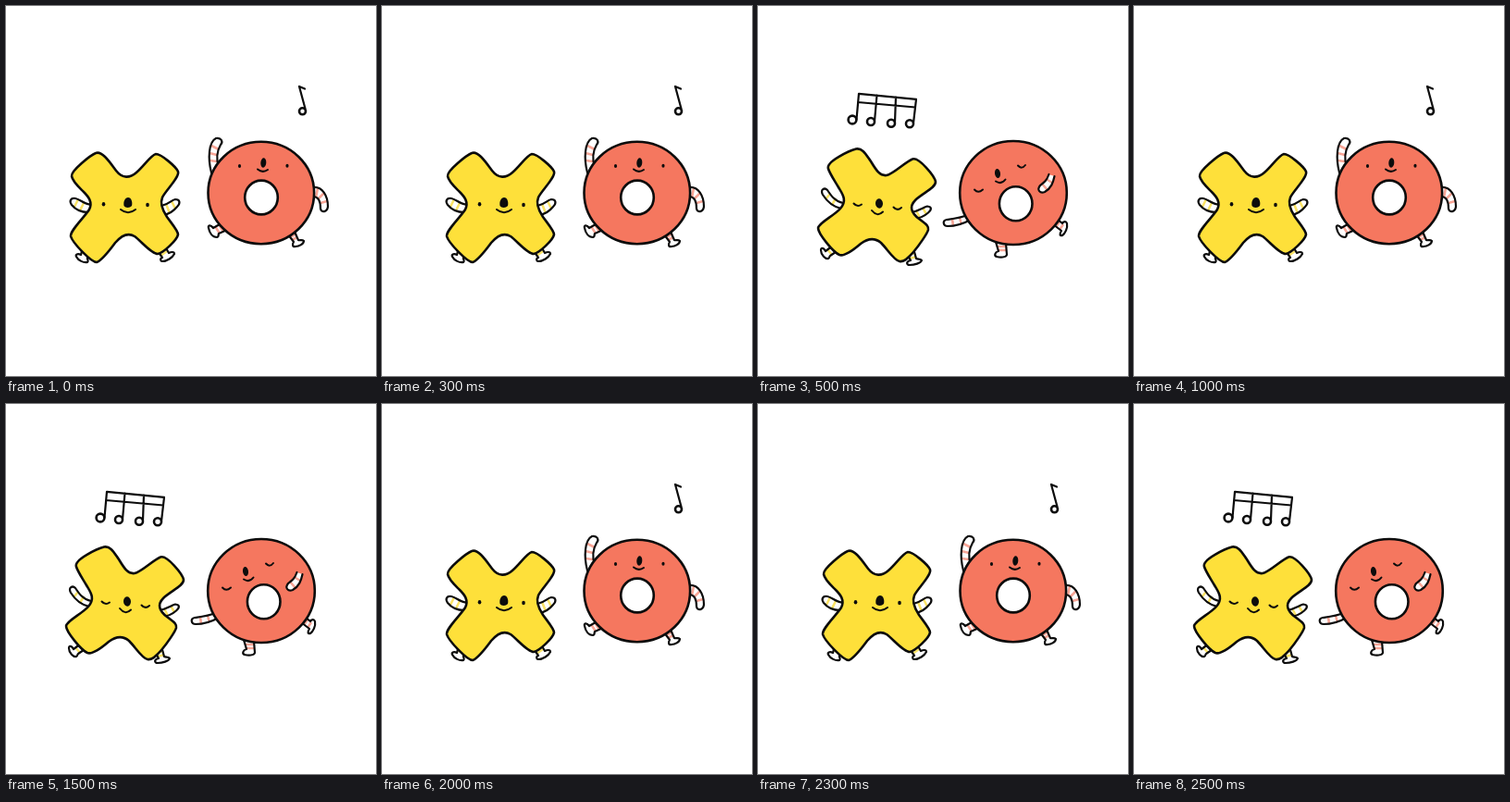
These frames come from a looping animation (400 px wide and 400 px high, 3000 ms). An HTML page:

```html
<!DOCTYPE html>
<html lang="en">
<head>
<meta charset="utf-8">
<title>Dancing X and O</title>
<style>
html, body { margin: 0; width: 100%; height: 100%; overflow: hidden; background: #fff; }
svg { display: block; width: 100vw; height: 100vh; }
path, ellipse { stroke-linecap: round; stroke-linejoin: round; }
.line { fill: none; stroke: #0c0c0c; stroke-width: 2.6; }
.thin { stroke-width: 2; }
.limb { stroke-width: 2.2; }
.white { fill: #fff; }
.x { fill: #fee03a; }
.o { fill: #f5775f; }
.ink { fill: #0c0c0c; }
.band { fill: none; stroke-width: 2.6; stroke-linecap: butt; }
.band.bx { stroke: #fbe366; }
.band.bo { stroke: #f8a596; }
</style>
</head>
<body>
<svg id="stage" viewBox="0 0 400 400"></svg>
<script>
const BEAT = 500, LOOP = 3000;

const line = (d, cls = '') => `<path class="line ${cls}" d="${d}"/>`;
const oval = (x, y, rx, ry, cls, turn = 0) =>
  `<ellipse class="${cls}" cx="${x}" cy="${y}" rx="${rx}" ry="${ry}" transform="rotate(${turn} ${x} ${y})"/>`;
const limb = (kind, d, bands) =>
  `<path class="white" d="${d}"/><path class="band b${kind}" d="${bands}"/>` + line(d, 'limb');
const head = (x, y, r) => oval(x, y, r, r, 'line white');

function openEyed() {
  const x =
    limb('x', 'M92 215C84 214 80 209 75 208C70 207 68 211 71 215C75 220 82 223 89 223', 'M78 209L74 217M84 213L80 221') +
    limb('x', 'M168 216C177 214 178 210 183 209C188 209 189 213 185 217C181 222 176 225 170 226', 'M179 211L183 219M173 214L177 224') +
    limb('x', 'M83 261L81 269C77 267 75 269 76 271C78 275 84 278 88 277C90 275 87 273 88 272L92 265', 'M82 266L89 270M84 262L91 266') +
    limb('x', 'M164 265L169 272C166 273 167 276 169 276C174 276 180 272 182 268C182 265 178 266 176 267L172 260', 'M167 270L174 265M165 266L172 261') +
    line('M71 184C70 178 92 161 97 159C104 156 113 170 119 178C126 187 134 186 141 180C149 173 157 161 162 160C168 160 184 174 186 179C188 185 172 200 169 207C166 214 170 222 174 228C179 235 186 243 186 247C185 253 170 267 164 268C157 268 146 254 139 249C131 244 124 249 118 256C112 264 104 275 98 277C92 277 72 256 70 249C69 243 85 228 90 220C94 212 89 206 84 201C79 196 72 190 71 184Z', 'x') +
    oval(105.5, 214.3, 1.8, 2.3, 'ink') + oval(153, 215, 1.8, 2.3, 'ink') +
    '<path class="ink" d="M127.5 216C126.5 211 129 207 132 207C135.5 207 137 212 136 216C134 218.5 129 218.5 127.5 216Z"/>' +
    line('M124 220Q132 226.5 140 220', 'thin');
  const o =
    limb('o', 'M222 180C218 165 219 147 227 143C233 142 235 147 232 150C228 157 227 165 230 174', 'M222 151L230 155M220 159L228 161M220 167L228 168') +
    limb('o', 'M332 196C342 195 348 205 348 217C347 223 341 224 340 219C340 212 338 206 332 206', 'M337 197L335 207M344 202L338 208M347 211L340 213') +
    limb('o', 'M231 236L224 240C221 236 218 237 219 240C220 245 223 250 228 250C231 249 229 247 230 246L239 242', 'M226 238L231 246M230 236L235 244') +
    limb('o', 'M305 247L311 255C309 258 310 261 313 260C317 260 322 257 322 254C320 252 317 254 316 253L312 244', 'M309 253L315 250M307 250L314 246') +
    oval(275.8, 202, 57.3, 55.2, 'line o') + oval(276, 207, 17.8, 18.4, 'line white') +
    oval(252.5, 173, 1.6, 2, 'ink') + oval(304, 172.7, 1.6, 2, 'ink') +
    oval(278.3, 169.5, 3, 5.2, 'ink', 5) +
    line('M272 176.5Q277.5 181 283 177', 'thin');
  const note = line('M323 89.5L317 87L323.5 111', 'limb') + head(320.5, 113.8, 3.5);
  return x + o + note;
}

function eyesShut() {
  const x =
    limb('x', 'M92 213C83 211 79 205 75 199C72 196 67 198 70 204C75 212 81 217 90 219', 'M78 203L73 209M84 208L80 215') +
    limb('x', 'M165 223C174 222 178 218 183 216.5C188 217 188 220 184 223.5C179 228 174 230 167 230', 'M178 218L182 225M171 221L175 229') +
    limb('x', 'M81 259L73 265C71 261 68 261 68 264C68 269 73 274 76 273C78 272 77 270 78 270L87 264', 'M75 263L80 269M80 260L85 266') +
    limb('x', 'M160 266L165 275C160 276 160 280 164 280C169 280 176 278 177 275C176 273 173 274 171 273L168 262', 'M164 273L171 271M162 269L170 267') +
    line('M76 176C73 168 100 156 106 154.5C113 153 117 161 122 168C128 178 132 184 139 183C146 182 160 168 167 165.5C174 163 191 184 192 190C192 197 178 202 170 210C163 217 166 224 174 230C180 235 185 237 184 242C183 246 174 259 168 266C161 274 157 277 153 276C147 275 140 263 133 256C127 251 119 251 111 257C104 263 93 271 88 269C81 266 65 246 65 240C66 234 82 227 89 219C97 210 91 203 87 196C83 189 78 182 76 176Z', 'x') +
    line('M103.5 213.5Q107.5 218 112 214.5M146.5 217.5Q150.5 222 155 218', 'thin') +
    oval(131, 213.5, 4, 5.2, 'ink', -4) +
    line('M123 221Q129 228.5 135 222.5', 'thin');
  const o =
    limb('o', 'M227 226C219 229 211 230 204 231C199 232 200 238 205 238C213 238 221 236 230 231', 'M210 230L211 238M218 229L220 236') +
    limb('o', 'M257 255L260 265C256 266 255 270 258 271C262 272 268 272 269 269L268 256', 'M259 264L269 264M259 260L269 260') +
    limb('o', 'M319 236L328 243C326 246 326 249 329 248C332 246 335 240 334 235C333 232 330 233 329 235L323 230', 'M326 242L330 236M322 239L326 233') +
    oval(276, 202, 57.8, 56, 'line o') + oval(278.7, 213.7, 17.8, 18.5, 'line white') +
    limb('o', 'M314.5 182C312 189 309 191 305 194C301 199 305 203 310 201C317 197 319 191 320.5 184', 'M311.5 187L318 191M307 192L313 199') +
    line('M234 198.5Q238 203 243 198.5M281 172.5Q285 177 289 172', 'thin') +
    oval(259, 181, 3, 5, 'ink', -8) +
    line('M257 189.5Q263 193.5 267.5 187.5', 'thin');
  const notes =
    line('M106.5 122.5L109 94.8L171 100.8L168 126.5M108 104L170 109.5M128.5 96.5L126 124.5M149 98.5L148 125.5', 'limb') +
    head(102, 123, 4.4) + head(122, 125, 4) + head(144, 126.7, 4) + head(164, 127.3, 4);
  return x + o + notes;
}

const stage = document.getElementById('stage');
stage.innerHTML = `<g>${openEyed()}</g><g>${eyesShut()}</g>`;
const poses = [...stage.children];

function draw(ms) {
  const now = Math.floor((ms % LOOP) / BEAT) % poses.length;
  poses.forEach((g, i) => g.setAttribute('visibility', i === now ? 'visible' : 'hidden'));
}

const start = performance.now();
function tick() {
  draw(performance.now() - start);
  requestAnimationFrame(tick);
}
tick();
</script>
</body>
</html>
```
